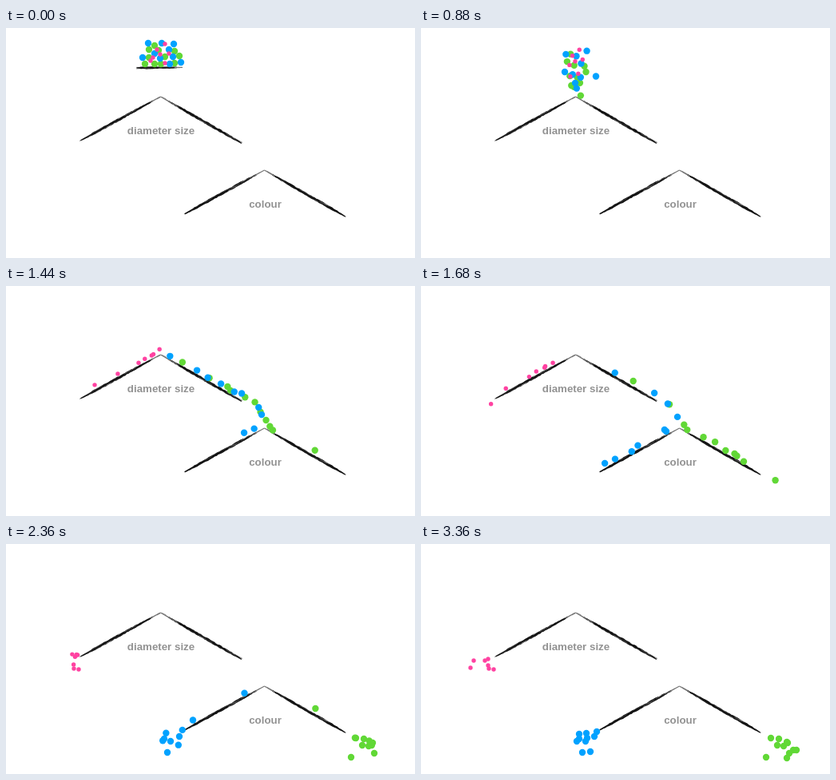
An HTML page that plays this animation: 512 by 288 pixels, repeating every 3.88 s.

```html
<!DOCTYPE html>
<html lang="en">
<head>
<meta charset="utf-8">
<title>Sorting balls</title>
<style>
html, body { margin: 0; width: 100%; height: 100%; overflow: hidden; background: #fff; }
svg { display: block; width: 100vw; height: 100vh; }
text { font: bold 13.3px "Liberation Sans", Arial, sans-serif; fill: #929292; text-anchor: middle; }
</style>
</head>
<body>
<svg id="stage" viewBox="0 0 512 288">
  <g id="ramps"></g>
  <g id="shelf"></g>
  <text x="194" y="133">diameter size</text>
  <text x="324.5" y="224.6">colour</text>
  <g id="balls"></g>
</svg>
<script>
const LOOP = 3880, STEP = 40, CUT = 520, START = 600, END = 3360;
const $ = id => document.getElementById(id);

function add(parent, tag, attrs) {
  const el = document.createElementNS('http://www.w3.org/2000/svg', tag);
  for (const k in attrs) el.setAttribute(k, attrs[k]);
  return parent ? parent.appendChild(el) : el;
}

let seed = 11;
const rnd = () => (seed = seed * 16807 % 2147483647) / 2147483647;

// Charcoal line: a rough tapered body with loose strands over it
function charcoal(parent, x1, y1, x2, y2, width, fade) {
  const len = Math.hypot(x2 - x1, y2 - y1);
  const ux = (x2 - x1) / len, uy = (y2 - y1) / len;
  const at = (d, o) => (x1 + ux * d - uy * o).toFixed(2) + ' ' + (y1 + uy * d + ux * o).toFixed(2);
  const body = f => width * Math.min(1, .3 + f * 2.2, .35 + (1 - f) * 4) / 2;
  const top = [], low = [];
  for (let d = len * fade; d <= len; d += 2.5) {
    const h = body(d / len);
    top.push(at(d, -h * (.65 + rnd() * .45)));
    low.unshift(at(d, h * (.65 + rnd() * .45)));
  }
  add(parent, 'path', { d: 'M' + top.concat(low).join('L') + 'Z', fill: '#111' });
  for (let i = 0; i < 26; i++) {
    const d = rnd() * len * .94, e = Math.min(len, d + 5 + rnd() * 14);
    const o = (rnd() - .5) * 2 * body(d / len);
    add(parent, 'path', {
      d: 'M' + at(d, o) + 'L' + at(e, o + (rnd() - .5) * .6),
      stroke: i % 4 ? '#222' : '#ddd', 'stroke-width': i % 4 ? .7 : .4, opacity: .7
    });
  }
  add(parent, 'path', {
    d: 'M' + at(0, 0) + 'L' + at(len * fade + 3, 0), stroke: '#777', 'stroke-width': 1.3
  });
}

for (const [x, y] of [[193.5, 86], [323.5, 178]]) {
  charcoal($('ramps'), x, y, x - 101, y + 55.5, 3.4, .1);
  charcoal($('ramps'), x, y, x + 102, y + 58.5, 3.4, .1);
}
charcoal($('shelf'), 221, 49.3, 163, 50, 3, .12);

// Polyline with rounded corners
function route(pts) {
  let d = 'M' + pts[0];
  for (let i = 1; i < pts.length - 1; i++) {
    const p = pts[i];
    const near = q => {
      const l = Math.hypot(q[0] - p[0], q[1] - p[1]) || 1, k = Math.min(7, l / 2) / l;
      return [p[0] + (q[0] - p[0]) * k, p[1] + (q[1] - p[1]) * k];
    };
    d += 'L' + near(pts[i - 1]) + 'Q' + p + ' ' + near(pts[i + 1]);
  }
  return add(null, 'path', { d: d + 'L' + pts[pts.length - 1] });
}

// Each ball: start x, y, resting x, y, travel time in ms
const first = [[294, 136], [312, 147], [323, 163]];
const groups = [
  { color: '#61d836', r: 4.2, via: [...first, [328, 175], [428, 231]], balls: [
    [194, 45, 454, 253, 1240], [186, 45, 438, 243, 1460], [174, 45, 432, 267, 1480],
    [211, 44, 459, 249, 1560], [199, 36, 461, 262, 1645], [179, 37, 446, 252, 1665],
    [217, 35, 448, 244, 1725], [211, 29, 458, 248, 1880], [191, 28, 466, 258, 1965],
    [179, 27, 458, 268, 2170], [186, 22, 470, 258, 2640]] },
  { color: '#00a2ff', r: 4.2, via: [...first, [314, 177], [228, 225]], balls: [
    [205, 45, 202, 261, 1425], [193, 38, 198, 244, 1450], [209, 36, 206, 247, 1540],
    [186, 32, 217, 241, 1545], [171, 37, 195, 247, 1835], [219, 43, 198, 238, 1868],
    [204, 27, 212, 260, 1960], [195, 19, 208, 243, 2040], [178, 19, 207, 237, 2180],
    [210, 20, 220, 235, 2700]] },
  { color: '#ff42a1', r: 2.7, via: [[92, 136]], balls: [
    [181, 41, 85, 156, 1260], [199, 44, 91, 157, 1550], [184, 37, 84, 152, 1860],
    [193, 33, 84, 144, 1940], [204, 32, 80, 146, 2110], [189, 27, 66, 146, 2200],
    [199, 20, 62, 155, 2350]] }
];

const movers = groups.flatMap(({ color, r, via, balls }) => balls.map(([x, y, ex, ey, time], i) => {
  const lift = (i * 7 % 5 - 2) * 1.1;
  const land = x > 218 ? [x, 93] : [193, 81];
  const path = route([[x, y], land, ...via.map(p => [p[0], p[1] + lift]), [ex, ey]]);
  return { path, len: path.getTotalLength(), time, dot: add($('balls'), 'circle', { r, fill: color }) };
}));

const clamp = v => Math.max(0, Math.min(1, v));
const ease = p => (1 - Math.cos(Math.PI * p)) / 2;

function draw(now) {
  const t = Math.min(END, Math.floor(now % LOOP / STEP) * STEP);
  $('shelf').setAttribute('opacity', t < CUT ? 1 : clamp((640 - t) / 130));
  for (const { path, len, time, dot } of movers) {
    const p = path.getPointAtLength(len * ease(clamp((t - START) / time)));
    dot.setAttribute('cx', p.x);
    dot.setAttribute('cy', p.y);
  }
}

const begin = performance.now();
function tick() {
  draw(performance.now() - begin);
  requestAnimationFrame(tick);
}
tick();
</script>
</body>
</html>
```
